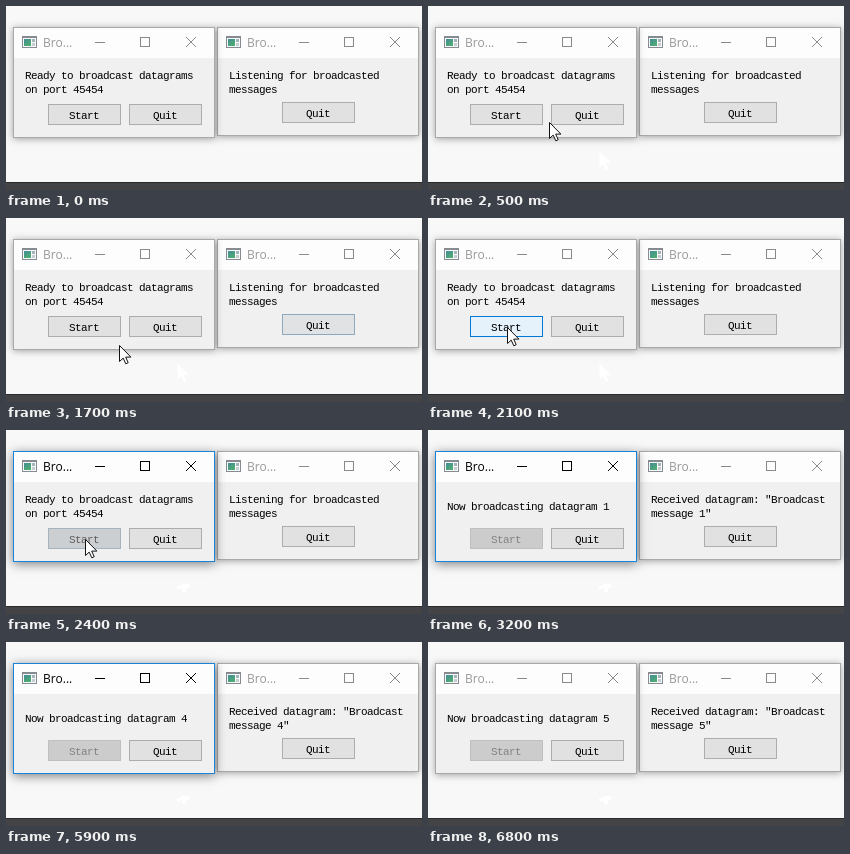
An HTML page with a canvas that plays this animation: 416x184 px, repeating every 6900 ms.

```html
<!DOCTYPE html>
<html lang="en">
<head>
<meta charset="utf-8">
<title>Broadcast sender and receiver</title>
<style>
html, body { margin: 0; width: 100%; height: 100%; overflow: hidden; background: #f8f8f8; }
canvas { display: block; }
</style>
</head>
<body>
<canvas id="stage" width="416" height="184"></canvas>
<script>
const LOOP = 6900;
const ctx = document.getElementById('stage').getContext('2d');
const MONO = '11px "Liberation Mono", monospace';
const TITLE = '12px "Open Sans", "Noto Sans", sans-serif';

// Pointer stops: time, x, y; each holds until the next. No position hides it.
const pointerStops = [
  [0], [200, 171, 145], [300, 154, 133], [400, 135, 122], [500, 121, 116],
  [600, 112, 114], [700, 117, 114], [800, 123, 114], [900, 126, 114],
  [1000, 128, 115], [1200, 124, 117], [1300, 118, 119], [1400, 112, 122],
  [1500, 111, 125], [1600, 112, 126], [1700, 113, 127], [1800, 107, 122],
  [1900, 96, 116], [2000, 84, 110], [2100, 79, 109], [2500, 94, 111],
  [2800, 107, 140], [2900]
];

const buttonLooks = {
  normal: ['#e1e1e1', '#adadad', '#000'],
  tinted: ['#e1e2e3', '#8ea9bd', '#000'],
  hover: ['#e5f1fb', '#0078d7', '#000'],
  pressed: ['#cce4f7', '#005499', '#000'],
  fading: ['#cccfd2', '#a6b4c0', '#606060'],
  disabled: ['#cccccc', '#bfbfbf', '#838383']
};

function rect(x, y, w, h, color) {
  ctx.fillStyle = color;
  ctx.fillRect(x, y, w, h);
}

function frame(x, y, w, h, color) {
  ctx.strokeStyle = color;
  ctx.lineWidth = 1;
  ctx.strokeRect(x + 0.5, y + 0.5, w - 1, h - 1);
}

function text(str, x, y, color, font, spacing) {
  ctx.font = font;
  ctx.letterSpacing = spacing;
  ctx.fillStyle = color;
  ctx.fillText(str, x, y);
}

const mono = (str, x, y, color = '#000') => text(str, x, y, color, MONO, '-0.6px');

function button(label, x, y, look) {
  const [fill, edge, ink] = buttonLooks[look];
  rect(x, y, 73, 21, fill);
  frame(x, y, 73, 21, edge);
  mono(label, x + Math.round(36 - label.length * 3), y + 15, ink);
}

function icon(x, y) {
  rect(x, y, 15, 12, '#858b90');
  rect(x + 1, y + 2, 13, 9, '#f7f9fa');
  const g = ctx.createLinearGradient(x, y, x + 6, y + 10);
  g.addColorStop(0, '#3f7fa8');
  g.addColorStop(1, '#4eab72');
  rect(x + 2, y + 3, 7, 7, g);
  rect(x + 10, y + 3, 3, 3, '#a5b4bb');
  rect(x + 10, y + 7, 3, 3, '#c5cdd1');
}

function windowBox(x, y, w, h, active) {
  ctx.save();
  ctx.shadowColor = active ? 'rgba(0,0,0,.5)' : 'rgba(0,0,0,.36)';
  ctx.shadowBlur = active ? 10 : 7;
  ctx.shadowOffsetY = active ? 2 : 1;
  rect(x, y, w, h, '#f0f0f0');
  ctx.restore();
  rect(x, y, w, 31, '#fdfdfd');
  frame(x, y, w, h, active ? '#1883d7' : '#a9a9a9');

  const ink = active ? '#000' : '#8a8a8a';
  icon(x + 9, 30);
  text('Bro...', x + 30, 41, active ? '#000' : '#999', TITLE, '0px');
  rect(x + 82, 36, 10, 1, ink);
  frame(x + 127, 31, 10, 10, ink);
  ctx.beginPath();
  ctx.moveTo(x + 173, 31);
  ctx.lineTo(x + 183, 41);
  ctx.moveTo(x + 183, 31);
  ctx.lineTo(x + 173, 41);
  ctx.stroke();
}

function arrowPath(x, y) {
  ctx.beginPath();
  [[0, 0], [0, 16], [3.7, 12.6], [6.3, 18.3], [8.7, 17.2], [6.2, 11.6], [11.4, 11.6]]
    .forEach(([dx, dy]) => ctx.lineTo(x + dx + 0.5, y + dy + 0.5));
  ctx.closePath();
}

function pointer(t) {
  const [, x, y] = pointerStops.findLast(stop => stop[0] <= t);
  if (x === undefined) return;
  arrowPath(x, y);
  ctx.fillStyle = '#fff';
  ctx.fill();
  ctx.strokeStyle = '#111';
  ctx.lineWidth = 1;
  ctx.stroke();
}

// Faint trail left below the sender window.
function trail(t) {
  if (t < 300) return;
  ctx.fillStyle = '#fff';
  if (t < 2200) {
    arrowPath(171, 145);
    ctx.fill();
  } else {
    ctx.fillRect(171, 156, 4, 3);
    ctx.fillRect(175, 154, 8, 4);
    ctx.fillRect(176, 158, 4, 4);
  }
}

function startLook(t) {
  if (t < 1900) return 'normal';
  if (t < 2000) return 'tinted';
  if (t < 2200) return 'hover';
  if (t < 2300) return 'pressed';
  return t < 2500 ? 'fading' : 'disabled';
}

const during = (t, from, to) => t >= from && t < to ? 'tinted' : 'normal';

function sender(t, count) {
  windowBox(7, 21, 202, 111, t >= 2200 && t < 6800);
  if (count) {
    mono('Now broadcasting datagram ' + count, 19, 80);
  } else {
    mono('Ready to broadcast datagrams', 19, 73);
    mono('on port 45454', 19, 87);
  }
  button('Start', 42, 98, startLook(t));
  button('Quit', 123, 98, during(t, 1000, 1300));
}

function receiver(t, count) {
  windowBox(211, 21, 202, 109, false);
  mono(count ? 'Received datagram: "Broadcast' : 'Listening for broadcasted', 223, 73);
  mono(count ? `message ${count}"` : 'messages', 223, 87);
  button('Quit', 276, 96, during(t, 1500, 2000));
}

function draw() {
  const t = performance.now() % LOOP;
  const count = t < 3200 ? 0 : 1 + Math.floor((t - 3200) / 900);
  rect(0, 0, 416, 184, '#f8f8f8');
  receiver(t, count);
  sender(t, count);
  trail(t);
  rect(0, 176, 416, 8, '#444446');
  rect(0, 176, 416, 1, '#2b2b2d');
  pointer(t);
  requestAnimationFrame(draw);
}

draw();
</script>
</body>
</html>
```
